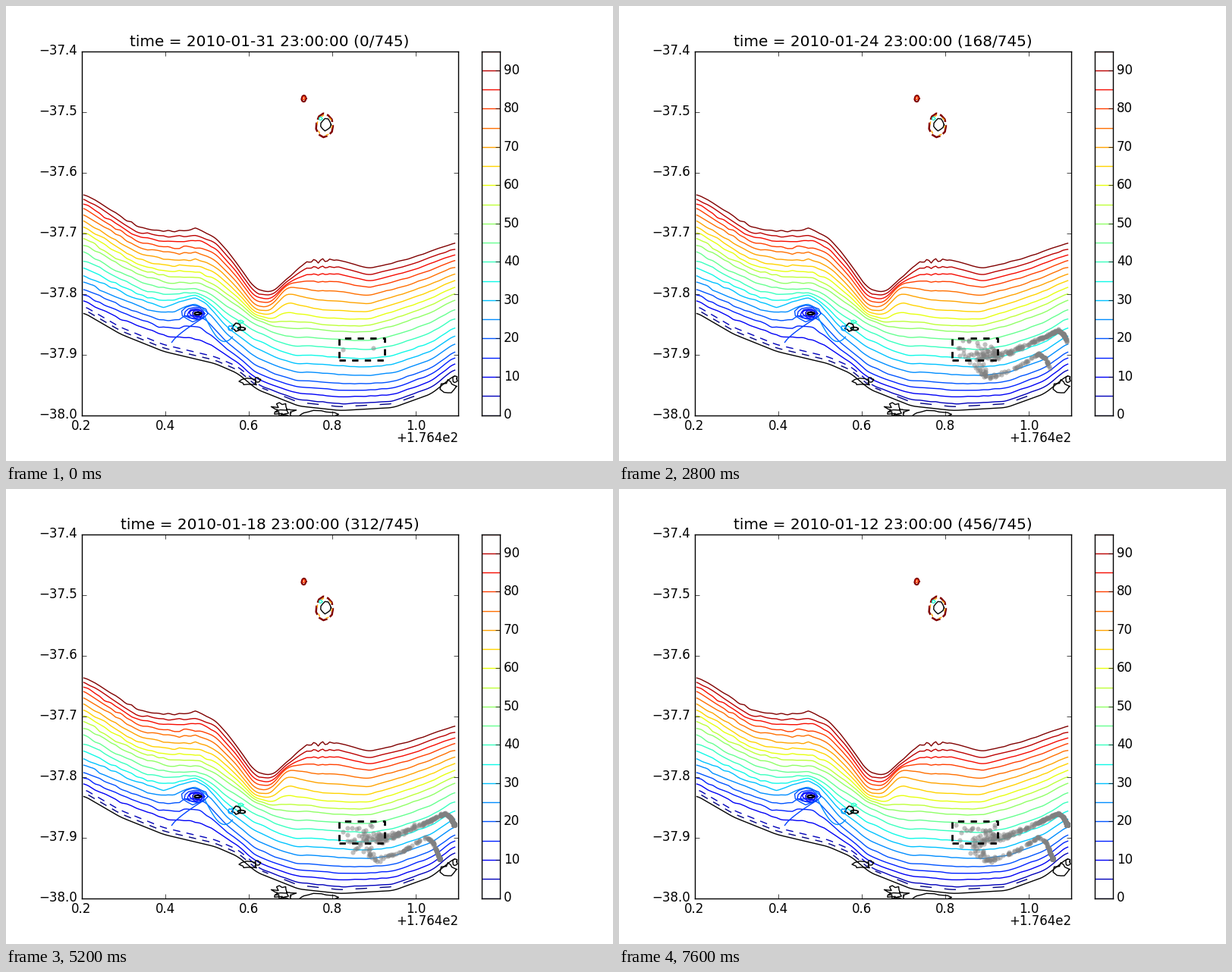
A matplotlib script that plays this animation: 800 by 600 pixels, repeating every 8000 ms.

```python
import numpy as np
import matplotlib.pyplot as plt
from matplotlib.animation import FuncAnimation

plt.style.use("classic")
plt.rcParams.update({"font.family": "DejaVu Sans", "figure.dpi": 100,
                     "savefig.dpi": 100, "figure.facecolor": "white",
                     "savefig.facecolor": "white"})

FRAMES, INTERVAL, STEP = 20, 400, 24  # one day of model hours per frame
rng = np.random.default_rng(7)
jet = plt.get_cmap("jet")


def color(level):
    return jet(level / 95)


# Map axes measured in stage pixels, labelled in degrees.
fig = plt.figure(figsize=(8, 6))
ax = fig.add_axes([99.5 / 800, 60.5 / 600, 0.62, 0.8])
ax.set_xlim(99, 595)
ax.set_ylim(539, 59)
ax.set_xticks([99 + 496 / 4.5 * i for i in range(5)],
              [f"{0.2 + 0.2 * i:.1f}" for i in range(5)])
ax.set_yticks([59 + 80 * i for i in range(7)],
              [f"\u2212{37.4 + 0.1 * i:.1f}" for i in range(7)])
fig.text(596 / 800, 25 / 600, "+1.764e2", ha="right", va="baseline", fontsize=12)
title = ax.set_title("")

bar = fig.add_axes([626.5 / 800, 60.5 / 600, 24 / 800, 0.8])
bar.set_xlim(0, 1)
bar.set_ylim(0, 95)
bar.set_xticks([])
bar.set_yticks(range(0, 91, 10))
bar.tick_params(left=False, right=True, labelleft=False, labelright=True)
for level in range(0, 96, 5):
    bar.plot([0, 1], [level, level], color=color(level), lw=1)


def curve(points):
    """Height along xs through a few points, with softened corners."""
    y = np.interp(xs, *zip(*points))
    return np.convolve(np.pad(y, 2, mode="edge"), np.ones(5) / 5, mode="valid")


def bump(x, level, at_x, at_level, width, spread):
    return np.exp(-((x - at_x) / width) ** 2 / 2 - ((level - at_level) / spread) ** 2 / 2)


def depth_share(x, level):
    """Distance of a contour from the shore: 0 at the coast, 1 at the deepest line."""
    share = np.interp(level, [0, 10, 20, 35, 50, 80, 95],
                      [0, 0.09, 0.18, 0.36, 0.57, 0.87, 1])
    share = (share
             + 0.07 * bump(x, level, 175, 24, 45, 15)    # western shelf
             + 0.16 * bump(x, level, 252, 26, 24, 11)    # shoal
             + 0.14 * bump(x, level, 335, 42, 22, 15)    # valley floor
             + 0.11 * bump(x, level, 368, 72, 14, 10)    # steep valley wall
             - 0.06 * bump(x, level, 430, 60, 40, 12))   # eastern plain
    return np.minimum(share, 1)


xs = np.arange(102, 592, 3.0)
deepest = curve([(102, 246), (140, 270), (175, 292), (215, 297), (252, 294), (275, 304),
                 (300, 333), (327, 372), (350, 377), (396, 336), (437, 334), (478, 346),
                 (530, 333), (591, 312)])
coast = curve([(102, 404), (150, 432), (207, 455), (275, 471), (305, 484), (330, 505),
               (385, 527), (440, 533), (510, 529), (560, 511), (591, 486)])
ripple = 3 * np.sin(0.6 * xs) * np.exp(-((xs - 413) / 15) ** 2)
knots = np.arange(102, 600, 7)
rough = np.where(knots < 270, 0.9, 0.25)

for level in range(5, 96, 5):
    share = depth_share(xs, level)
    y = coast - share * (coast - deepest) + ripple * share ** 12
    y += np.interp(xs, knots, rng.normal(0, rough))
    shown = xs > 330 if level == 5 else xs > 0
    ax.plot(xs[shown], y[shown], color=color(level), lw=1)

# Shore with the broken shallow contours hugging it.
ax.plot(xs, coast, "k", lw=1)
for level, lift, start, end in [(5, 9, 103, 330), (0, 4.5, 106, 345), (0, 5, 365, 548)]:
    part = (xs >= start) & (xs <= end)
    ax.plot(xs[part], coast[part] - lift, color=color(level), lw=1,
            dashes=(7, 6) if start < 300 else (11, 12))


def blob(x, y, rx, ry, c="k", lw=1, jag=0.12, sides=11, **style):
    angle = np.linspace(0, 2 * np.pi, sides + 1)
    radius = 1 + jag * rng.uniform(-1, 1, sides + 1)
    radius[-1] = radius[0]
    ax.plot(x + rx * radius * np.cos(angle), y + ry * radius * np.sin(angle),
            color=c, lw=lw, **style)


# Harbours and inlets.
blob(319, 496, 10, 4, jag=0.5)
blob(331, 492, 3, 3, jag=0.5)
blob(362, 531, 9, 6, jag=0.6, sides=18)
blob(368, 535, 10, 5, jag=0.6, sides=18)
blob(410, 538, 23, 5, jag=0.2, sides=14)
blob(583, 501, 8, 9, jag=0.5)
blob(591, 491, 3, 4, jag=0.4)

# Shoal with tight rings stretched to the west.
for level, size in zip(range(5, 21, 3), np.linspace(0.2, 1, 6)):
    blob(252 - 4 * size, 405, 16 * size, 10 * size, color(level), jag=0.15)
blob(252, 405, 5, 1.5, lw=1.5)
tail = np.linspace(0, 1, 15)
ax.plot(218 + 44 * tail, 443 - 34 * tail ** 0.8, color=color(18), lw=1)
ax.plot(262 + 36 * tail, 410 + 32 * np.sin(2.2 * tail), color=color(25), lw=1)

# Small island in the valley mouth.
blob(303, 423, 5, 6, lw=1.2, jag=0.3)
blob(310, 425, 5, 2, lw=1.2)
blob(309, 416, 4, 2, color(38), jag=0.4)
blob(296, 424, 3, 3, color(26), jag=0.4)

# Offshore islands ringed by steep contours.
blob(419.5, 157, 11.5, 15.5, color(95), 1.8, 0.05, dashes=(9, 3))
blob(419.5, 157, 10, 13.5, color(70), 1, 0.05, dashes=(3, 6))
blob(414, 148, 2, 2, color(38))
blob(421, 156, 7, 7.5)
blob(392, 121.5, 3, 4, color(95), 1.6)
blob(392, 121, 1.5, 2, color(80))

# Release box.
ax.plot([438, 498, 498, 438, 438], [466, 466, 437, 437, 466], "k--", lw=2, zorder=5)

# Two particles leave the box every hour and join one of two currents,
# each given as (age in hours, x, y).
north = np.array([(0, 466, 452), (24, 488, 461), (48, 516, 455), (72, 553, 439),
                  (104, 578, 427), (122, 585, 432), (170, 590, 442)])
south = np.array([(0, 462, 453), (16, 460, 471), (48, 485, 490), (76, 522, 477),
                  (108, 553, 458), (128, 562, 465), (195, 571, 487)])
count = 2 * ((FRAMES - 1) * STEP + 1)
birth = np.arange(count) // 2
origin = np.column_stack([rng.uniform(440, 498, count), rng.uniform(438, 466, count)])
origin[:2] = [(443, 452), (483, 450)]
is_north = rng.random(count) < 0.65
pace = rng.uniform(0.8, 1.03, count)
stray = rng.normal(0, 1.6, (count, 2))


def positions(hour):
    age = np.maximum(hour - birth, 0)
    result = np.empty((count, 2))
    for current, chosen in [(north, is_north), (south, ~is_north)]:
        t = age[chosen]
        track = np.column_stack([np.interp(t * pace[chosen], current[:, 0], current[:, i])
                                 for i in (1, 2)])
        fade = np.exp(-t / 26)[:, None]
        drift = (np.minimum(t / 30, 1) * np.exp(-t / 90))[:, None]
        result[chosen] = track + fade * (origin[chosen] - current[0, 1:]) + drift * stray[chosen]
    return result[birth <= hour]


dots = ax.scatter([], [], s=20, color="0.5", alpha=0.5, linewidths=0, zorder=4)


def update(frame):
    hour = frame * STEP
    dots.set_offsets(positions(hour))
    title.set_text(f"time = 2010-01-{31 - frame:02d} 23:00:00 ({hour}/745)")
    return dots, title


anim = FuncAnimation(fig, update, frames=FRAMES, interval=INTERVAL,
                     repeat=True, repeat_delay=0, blit=False)
plt.show()
```
